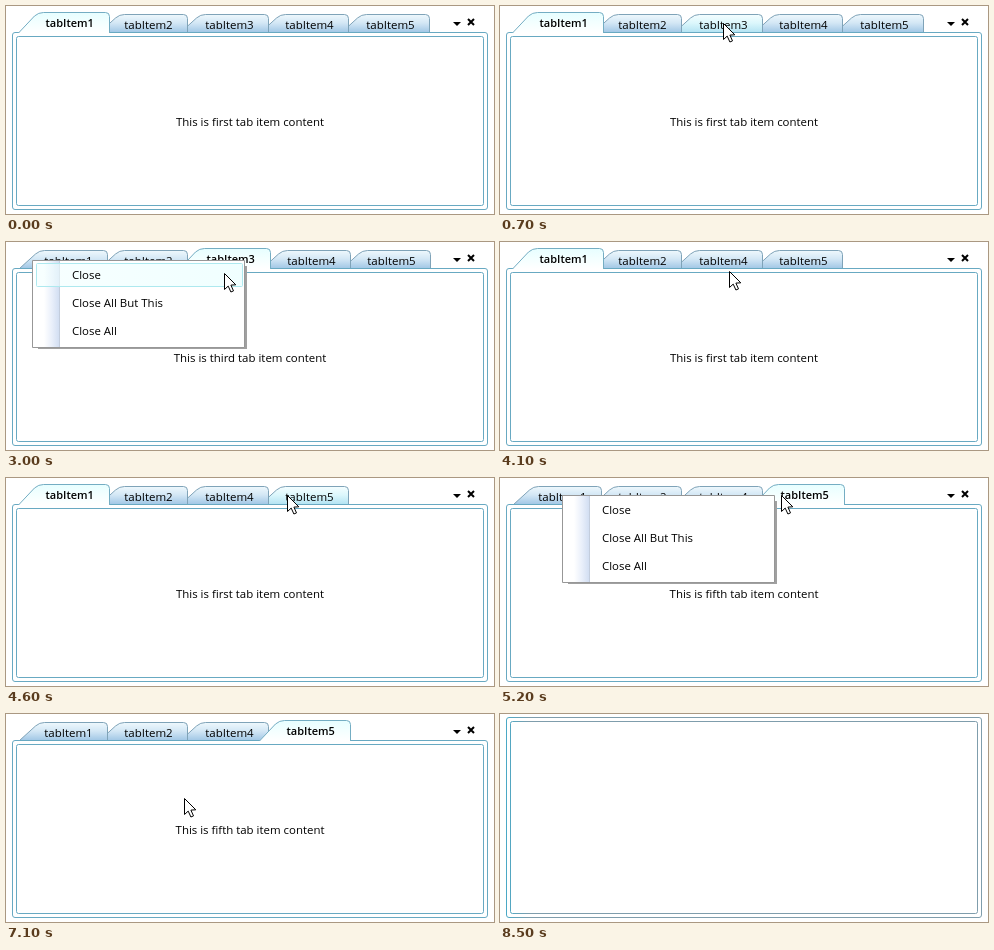
Animation of 488x208 px, one loop 9100 ms. Source, as an HTML page with a canvas:

```html
<!DOCTYPE html>
<html lang="en">
<head>
<meta charset="utf-8">
<title>Tab control with context menu</title>
<style>
  html, body { margin: 0; width: 100%; height: 100%; overflow: hidden; background: #fff; }
  canvas { display: block; width: 488px; height: 208px; }
</style>
</head>
<body>
<canvas id="stage" width="488" height="208"></canvas>
<script>
const ctx = document.getElementById('stage').getContext('2d');
const LOOP = 9100, STEP = 100;
const FONT = '"Open Sans", "Noto Sans", sans-serif';
const ORDINALS = ['first', 'second', 'third', 'fourth', 'fifth'];
const MENU_ITEMS = ['Close', 'Close All But This', 'Close All'];

// Pointer path: time, x, y
const POINTER = [
  [100, 355, 26], [400, 285, 23], [700, 223, 17], [800, 223, 17],
  [900, 248, 17], [1000, 244, 18], [2700, 244, 18], [3000, 218, 31],
  [4000, 218, 31], [4100, 229, 29], [4600, 281, 17], [5500, 281, 17],
  [5600, 291, 10], [6000, 207, 59], [6300, 184, 90], [6500, 178, 84],
  [8200, 178, 84], [8400, 239, 124]
];

// Which tabs are open and which one is selected, from each time on
const STATES = [
  { at: 0, tabs: [1, 2, 3, 4, 5], selected: 0 },
  { at: 2000, tabs: [1, 2, 3, 4, 5], selected: 2 },
  { at: 3600, tabs: [1, 2, 4, 5], selected: 0 },
  { at: 4900, tabs: [1, 2, 4, 5], selected: 3 },
  { at: 7200, tabs: [], selected: -1 }
];

const MENUS = [
  { open: 2200, full: 2400, close: 3500, x: 26, y: 18 },
  { open: 5100, full: 5200, close: 7100, x: 62, y: 17 }
];

function pointerAt(t) {
  if (t < POINTER[0][0] || t >= 8500) return null;
  const next = POINTER.findIndex(p => p[0] > t);
  if (next < 0) {
    const last = POINTER[POINTER.length - 1];
    return { x: last[1], y: last[2] };
  }
  const [t0, x0, y0] = POINTER[next - 1], [t1, x1, y1] = POINTER[next];
  const k = (t - t0) / (t1 - t0);
  return { x: Math.round(x0 + (x1 - x0) * k), y: Math.round(y0 + (y1 - y0) * k) };
}

function gradient(x0, y0, x1, y1, ...colors) {
  const g = ctx.createLinearGradient(x0, y0, x1, y1);
  colors.forEach((c, i) => g.addColorStop(i / (colors.length - 1), c));
  return g;
}

function text(str, x, y, size = 11.45, weight = 400, align = 'left') {
  ctx.font = `${weight} ${size}px ${FONT}`;
  ctx.textAlign = align;
  ctx.fillStyle = '#000';
  ctx.fillText(str, x, y);
}

function box(x, y, right, bottom, radius, stroke, fill) {
  ctx.beginPath();
  ctx.roundRect(x + 0.5, y + 0.5, right - x - 1, bottom - y - 1, radius);
  if (fill) {
    ctx.fillStyle = fill;
    ctx.fill();
  }
  ctx.strokeStyle = stroke;
  ctx.stroke();
}

function drawFrame(empty) {
  const top = empty ? 3 : 26;
  const line = empty
    ? gradient(6, 0, 30, 0, '#4aa9c6', '#7f9dac')
    : '#68a9c2';
  box(6, top, 482, 204, 2.5, line, '#fff');
  box(10, top + 4, 478, 200, 2, line);
}

function tabRight(i, selected) {
  const shift = selected === 0 ? (i === 0 ? 1.5 : 0) : (i >= selected ? 1.8 : 0);
  return Math.round(101 + 80.4 * i + shift);
}

function drawTab(label, right, active, hover) {
  const r = right + 0.5;
  const left = right - (active ? 91 : 88) + 0.5;
  const top = active ? 6.5 : 8.5;
  const base = active ? 27 : 26.5;
  ctx.beginPath();
  ctx.moveTo(left, base);
  ctx.lineTo(left + 16, top + 3.5);
  ctx.quadraticCurveTo(left + 20, top, left + 25, top);
  ctx.lineTo(r - 4, top);
  ctx.quadraticCurveTo(r, top, r, top + 4);
  ctx.lineTo(r, base);
  ctx.fillStyle = active ? gradient(0, 6, 0, 27, '#e6feff', '#f3ffff', '#fff')
    : hover ? gradient(0, 8, 0, 26, '#f6feff', '#dcf7fc', '#b5e4f3')
    : gradient(0, 8, 0, 26, '#f0f9fd', '#d3e7f5', '#a3c8e6');
  ctx.fill();
  ctx.strokeStyle = active ? '#74adc3' : '#7fa3b8';
  ctx.stroke();
  if (active) text(label, right - 63.5, 21, 11, 600);
  else text(label, right - 62.8, 23, 11.5);
}

function drawTabs({ tabs, selected }, pointer, menuOpen) {
  const draw = i => {
    const right = tabRight(i, selected);
    const hover = pointer && !menuOpen && pointer.y > 8 && pointer.y < 26 &&
      pointer.x > right - 79 && pointer.x <= right;
    drawTab('tabItem' + tabs[i], right, i === selected, hover);
  };
  for (let i = tabs.length - 1; i >= 0; i--) if (i !== selected) draw(i);
  // The frame's top edge stays in front of the unselected tabs
  ctx.fillStyle = '#68a9c2';
  ctx.fillRect(9, 26, 470, 1);
  draw(selected);
}

function polygon(...points) {
  ctx.beginPath();
  points.forEach(([x, y]) => ctx.lineTo(x, y));
  ctx.closePath();
}

function drawButtons() {
  ctx.fillStyle = '#000';
  polygon([447, 16], [455, 16], [451, 20]);
  ctx.fill();
  ctx.lineWidth = 2;
  ctx.strokeStyle = '#000';
  ctx.beginPath();
  ctx.moveTo(462, 13);
  ctx.lineTo(468, 19);
  ctx.moveTo(468, 13);
  ctx.lineTo(462, 19);
  ctx.stroke();
  ctx.lineWidth = 1;
}

function drawMenu({ x, y, open, full }, t, pointer) {
  ctx.save();
  ctx.globalAlpha = Math.min(1, (t - open + STEP) / (full - open + STEP));
  ctx.fillStyle = '#a0a0a0';
  ctx.fillRect(x + 6, y + 6, 209, 83);
  box(x, y, x + 213, y + 88, 0, '#979797', '#fff');
  ctx.fillStyle = gradient(x + 12, 0, x + 28, 0, '#fff', '#e9effa', '#cfdcf1');
  ctx.fillRect(x + 12, y + 1, 16, 86);
  ctx.fillStyle = '#c3cddd';
  ctx.fillRect(x + 27, y + 1, 1, 86);
  MENU_ITEMS.forEach((item, i) => {
    const mid = y + 15 + 28 * i;
    if (pointer.x > x && pointer.x < x + 213 && Math.abs(pointer.y - mid) <= 14) {
      box(x + 4, mid - 12, x + 211, mid + 12, 1, '#aee9ef',
        gradient(x, 0, x + 211, 0, 'rgba(240,255,255,.5)', '#f0ffff'));
    }
    text(item, x + 40, mid + 4);
  });
  ctx.restore();
}

function drawPointer({ x, y }) {
  ctx.save();
  ctx.translate(x + 0.5, y + 0.5);
  polygon([0, 0], [0, 16], [3.7, 12.6], [6.4, 18.5], [9, 17.4], [6.4, 11.6], [11.3, 11.3]);
  ctx.fillStyle = '#fff';
  ctx.fill();
  ctx.strokeStyle = '#000';
  ctx.stroke();
  ctx.restore();
}

function render(t) {
  const state = STATES.filter(s => s.at <= t).pop();
  const menu = MENUS.find(m => t >= m.open && t < m.close);
  const pointer = pointerAt(t);
  const empty = state.tabs.length === 0;

  ctx.fillStyle = '#fff';
  ctx.fillRect(0, 0, 488, 208);
  drawFrame(empty);
  if (!empty) {
    drawTabs(state, pointer, menu);
    drawButtons();
    const ordinal = ORDINALS[state.tabs[state.selected] - 1];
    text(`This is ${ordinal} tab item content`, 244, 120, 11.45, 400, 'center');
  }
  if (menu) drawMenu(menu, t, pointer);
  if (pointer) drawPointer(pointer);
}

const start = performance.now();
function tick() {
  const t = (performance.now() - start) % LOOP;
  render(Math.floor(t / STEP) * STEP);
  requestAnimationFrame(tick);
}
tick();
</script>
</body>
</html>
```
